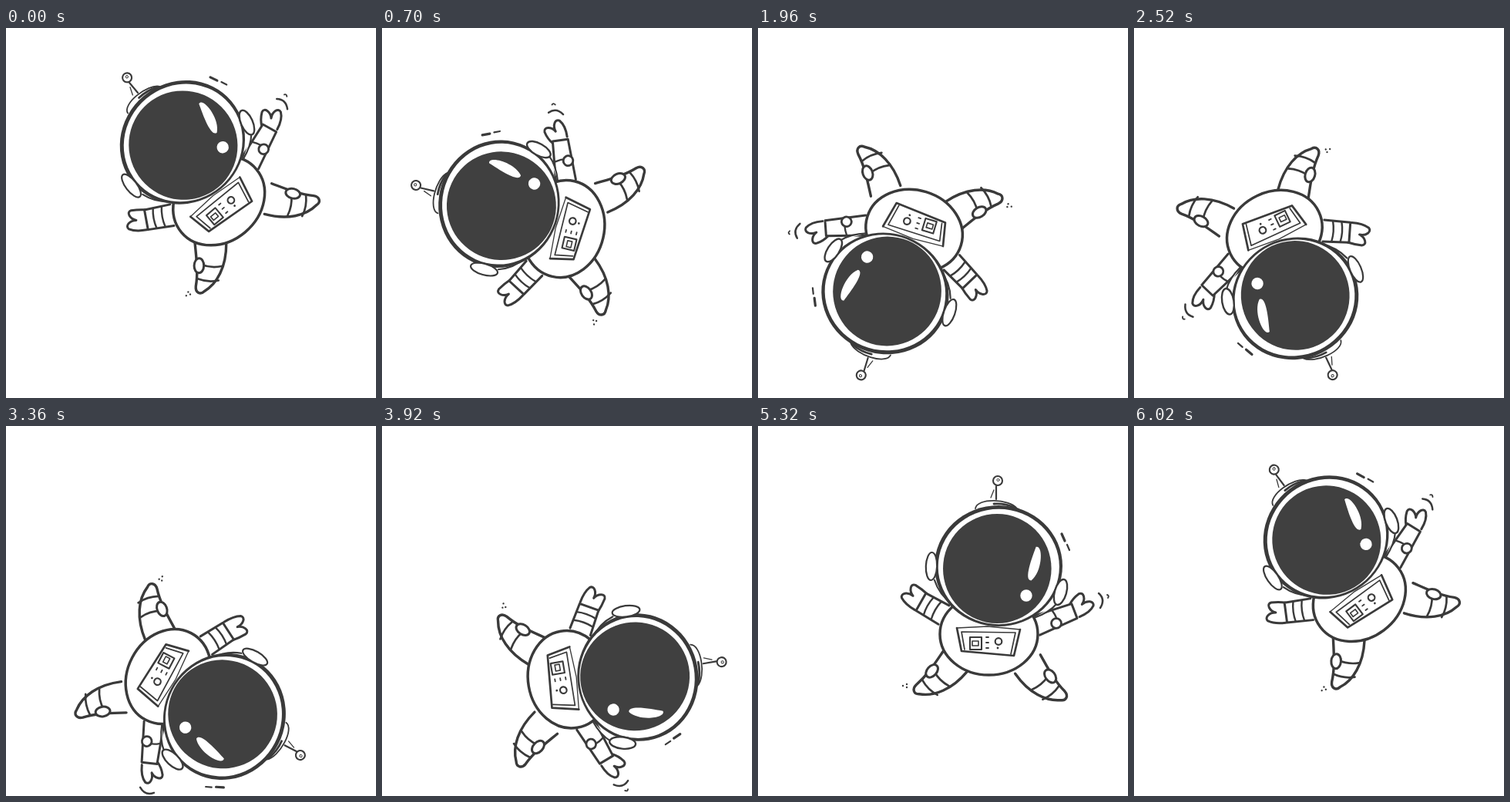
Recreate the animation shown at these times as an HTML page with a canvas. Size 480 px wide and 480 px high, loop 6160 ms.

```html
<!DOCTYPE html>
<html lang="en">
<head>
<meta charset="utf-8">
<title>Floating astronaut</title>
<style>
html, body { margin: 0; width: 100%; height: 100%; overflow: hidden; background: #fff; }
canvas { display: block; width: 480px; height: 480px; }
</style>
</head>
<body>
<canvas id="stage" width="480" height="480"></canvas>
<script>
const ctx = document.getElementById('stage').getContext('2d');
const INK = '#3a3a3a', VISOR = '#404040', PAPER = '#fff';
const STEP = 140, STEPS = 44, DEG = Math.PI / 180;

// Key poses: [pose, x, y, degrees] of the visor centre
const KEYS = [
  [0, 230, 152, -40], [7, 131, 262, -92], [10, 131, 310, -117.5],
  [16, 188, 352, -186], [18, 209, 347, -205.5], [22, 281, 374, -242.5],
  [29, 347, 279, -306.5], [36, 310.5, 185, -360], [41, 250, 148, -397]
];

function slope(i, c) {
  const a = KEYS[Math.max(i - 1, 0)], b = KEYS[Math.min(i + 1, KEYS.length - 1)];
  return (b[c] - a[c]) / (b[0] - a[0]);
}

// Smooth interpolation between key poses
function sample(k, c) {
  let i = 0;
  while (i < KEYS.length - 2 && k >= KEYS[i + 1][0]) i++;
  const a = KEYS[i], b = KEYS[i + 1], d = b[0] - a[0], s = (k - a[0]) / d;
  const e = s * s * (3 - 2 * s);
  return a[c] + (b[c] - a[c]) * e
    + d * s * (1 - s) * ((1 - s) * slope(i, c) - s * slope(i + 1, c));
}

function paint(width, fill) {
  if (fill) { ctx.fillStyle = fill; ctx.fill(); }
  if (width) { ctx.lineWidth = width; ctx.stroke(); }
}

function line(width, ...p) {
  ctx.beginPath();
  for (let i = 0; i < p.length; i += 2) ctx.lineTo(p[i], p[i + 1]);
  paint(width);
}

function arc(width, x0, y0, cx, cy, x1, y1, fill) {
  ctx.beginPath();
  ctx.moveTo(x0, y0);
  ctx.quadraticCurveTo(cx, cy, x1, y1);
  paint(width, fill);
}

function oval(x, y, rx, ry, turn, width, fill) {
  ctx.beginPath();
  ctx.ellipse(x, y, rx, ry, turn, 0, 2 * Math.PI);
  paint(width, fill);
}

// Draws in a local frame; side -1 mirrors it
function place(x, y, side, turn, part) {
  ctx.save();
  ctx.translate(x, y);
  ctx.scale(side, 1);
  ctx.rotate(turn * DEG);
  part();
  ctx.restore();
}

function hand(w) {
  ctx.beginPath();
  ctx.moveTo(0, -w);
  ctx.quadraticCurveTo(9, -14, 19, -13);
  ctx.bezierCurveTo(26, -11, 21, -2, 13, 0);
  ctx.bezierCurveTo(22, 0, 28, 7, 23, 11);
  ctx.quadraticCurveTo(14, 15, 0, w);
  paint(3, PAPER);
}

function arm(length, base, wrist, bands, handTurn) {
  place(length, 0, 1, handTurn, () => hand(wrist));
  ctx.beginPath();
  ctx.moveTo(0, -base);
  ctx.lineTo(length, -wrist);
  ctx.lineTo(length, wrist);
  ctx.lineTo(0, base);
  paint(3, PAPER);
  for (let i = 1; i <= bands; i++) {
    const x = length * i / (bands + 1);
    arc(2.4, x, -wrist, x + 3, 0, x, wrist);
  }
}

function leg() {
  ctx.beginPath();
  ctx.moveTo(4, -20);
  ctx.bezierCurveTo(22, -14, 40, -7, 59, -6);
  ctx.bezierCurveTo(67, -5, 69, 2, 63, 6);
  ctx.bezierCurveTo(50, 20, 26, 27, -4, 20);
  paint(3.4, PAPER);
  for (const x of [28, 47]) arc(2.7, x + 2, -6, x + 4, 8, x - 2, 21);
  oval(32, -8, 9.5, 6.3, 0.2, 3, PAPER);
}

function antenna() {
  line(2.2, 309, 78, 309, 95);
  line(1.3, 306, 83, 302, 93);
  oval(311, 71, 6, 6, 0, 2.1);
  oval(311.5, 70, 1.6, 1.6, 0, 1);
  ctx.beginPath();
  ctx.moveTo(282, 107);
  ctx.bezierCurveTo(284, 93, 326, 94, 336, 107);
  paint(1.8, PAPER);
  arc(2.8, 306, 101, 320, 100, 334, 106);
}

function panel() {
  line(1.3, 258, 262, 298, 260, 340, 264);
  line(2.7, 258, 262, 264, 292, 332, 298, 340, 264);
  line(1.7, 268, 290, 264, 267, 334, 268, 328, 296);
  ctx.lineWidth = 2.1;
  ctx.strokeRect(275, 274, 15, 16);
  ctx.lineWidth = 1.6;
  ctx.strokeRect(278, 279, 8, 6);
  for (let i = 0; i < 3; i++) line(1.8, 296, 274 + 7 * i, 299, 274 + 7 * i);
  oval(312, 279.5, 4.3, 4.3, 0, 2.2);
  oval(311, 288, 1.4, 1.4, 0, 0, INK);
}

function head() {
  arc(2.2, 229, 200, 235, 219, 252, 231, PAPER);
  arc(2.2, 388, 230, 378, 242, 358, 249, PAPER);
  oval(312, 181.5, 83, 78.5, 0, 0, INK);
  oval(312.3, 182.5, 78.6, 74.7, 0, 0, PAPER);
  oval(310.3, 185, 70.3, 71, 0, 0, VISOR);
  place(359, 179, 1, 12, () => {
    ctx.beginPath();
    ctx.moveTo(-3, -22);
    ctx.bezierCurveTo(6, -27, 12, 8, 0, 22);
    ctx.bezierCurveTo(-10, 24, -5, -8, -3, -22);
    paint(0, PAPER);
  });
  oval(348, 220, 7.7, 7.7, 0, 0, PAPER);
  oval(225, 182, 7.2, 18, 0.04, 2.2, PAPER);
  oval(392.5, 215.5, 7.6, 17, 0.28, 2.4, PAPER);
}

function marks() {
  line(3.2, 394, 140, 398, 149);
  line(2.2, 401, 154, 404, 161);
  arc(2.5, 442, 217, 451, 225, 444, 236);
  arc(1.9, 453, 219, 456, 220, 454, 223);
  for (const [x, y] of [[188, 337], [193, 335], [193, 339]]) oval(x, y, 1.2, 1.2, 0, 0, INK);
}

function astronaut() {
  antenna();
  place(241, 245, -1, -29.5, () => arm(34, 14, 13, 2, -8));
  place(361, 259, 1, -21, () => arm(53, 13, 10, 1, -20));
  oval(387, 256, 6.5, 6.3, 0, 2.8, PAPER);
  place(256, 305, -1, 37, leg);
  place(350, 309, 1, 42, leg);
  oval(299.5, 270, 63.5, 53, 0, 3.5, PAPER);
  panel();
  head();
  marks();
}

function draw(now) {
  const n = Math.floor(now / STEP) % STEPS;
  // Two poses are held for a double beat
  const k = n - (n > 20) - (n > 22);
  ctx.setTransform(1, 0, 0, 1, 0, 0);
  ctx.fillStyle = PAPER;
  ctx.fillRect(0, 0, 480, 480);
  ctx.translate(sample(k, 1), sample(k, 2));
  ctx.rotate(sample(k, 3) * DEG);
  ctx.translate(-310.5, -185);
  ctx.strokeStyle = INK;
  ctx.lineCap = ctx.lineJoin = 'round';
  astronaut();
}

const start = performance.now();
function tick() {
  draw(performance.now() - start);
  requestAnimationFrame(tick);
}
tick();
</script>
</body>
</html>
```
